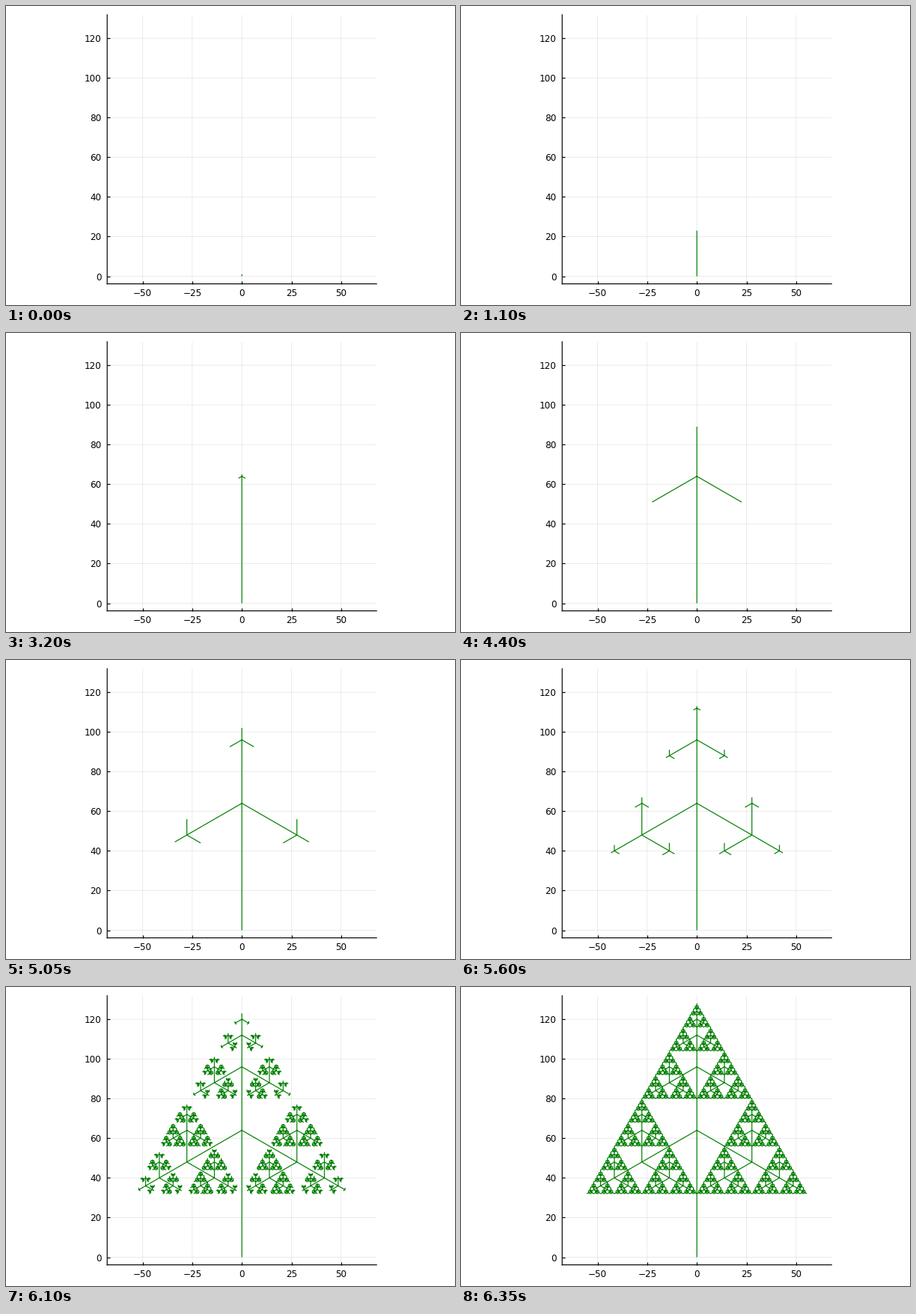
Write a matplotlib script that moves like this. It is 600x400 px and loops after 7.9 s.

```python
import math

import matplotlib.pyplot as plt
import numpy as np
from matplotlib.animation import FuncAnimation

DPI, W, H = 100, 600, 400
FRAMES, INTERVAL = 158, 50
PX = 72 / DPI  # points per pixel

plt.rcParams["font.family"] = "DejaVu Sans"
plt.rcParams["path.simplify"] = False


def grow(x, y, heading, start, size, out):
    """Add a branch growing one unit per step, then split it in three."""
    length = max(size, 1)
    dx, dy = math.cos(math.radians(heading)), math.sin(math.radians(heading))
    out.append((x, y, dx, dy, start, length))
    if size == 0:
        return
    x, y = x + dx * length, y + dy * length
    end = start + length - 1
    # side branches take their first step at once, the leader one step later
    for turn, first in ((0, end + 1), (120, end), (-120, end)):
        grow(x, y, heading + turn, first, size // 2, out)


branches = []
grow(0, 0, 90, 0, 64, branches)
X, Y, DX, DY, START, LENGTH = np.array(branches).T

fig = plt.figure(figsize=(W / DPI, H / DPI), dpi=DPI, facecolor="white")
left, bottom, side = 135.2, 371.7, 360
ax = fig.add_axes([left / W, 1 - bottom / H, side / W, side / H])
ax.set_xlim(-67.84, 67.84)
ax.set_ylim(-3.84, 131.84)
ax.set_xticks(range(-50, 51, 25))
ax.set_yticks(range(0, 121, 20))
ax.set_axisbelow(True)
ax.grid(color="black", alpha=0.1, linewidth=0.75 * PX, snap=False)
ax.tick_params(direction="in", length=4 * PX, width=1.2 * PX, labelsize=12 * PX)
ax.tick_params(axis="x", pad=6.5 * PX)
ax.tick_params(axis="y", pad=7.5 * PX)
for name, spine in ax.spines.items():
    spine.set_visible(name in ("left", "bottom"))
    spine.set_linewidth(1.2 * PX)
    spine.set_snap(False)

tree, = ax.plot([], [], color="green", linewidth=1.2 * PX, snap=False,
                solid_capstyle="butt", clip_on=False)


def update(step):
    grown = np.clip(step - START + 1, 0, LENGTH)
    on = grown > 0
    x, y, n = X[on], Y[on], grown[on]
    gap = np.full_like(x, np.nan)
    tree.set_data(np.column_stack((x, x + DX[on] * n, gap)).ravel(),
                  np.column_stack((y, y + DY[on] * n, gap)).ravel())
    return tree,


anim = FuncAnimation(fig, update, frames=FRAMES, interval=INTERVAL,
                     repeat=True, repeat_delay=0, blit=False)
plt.show()
```
